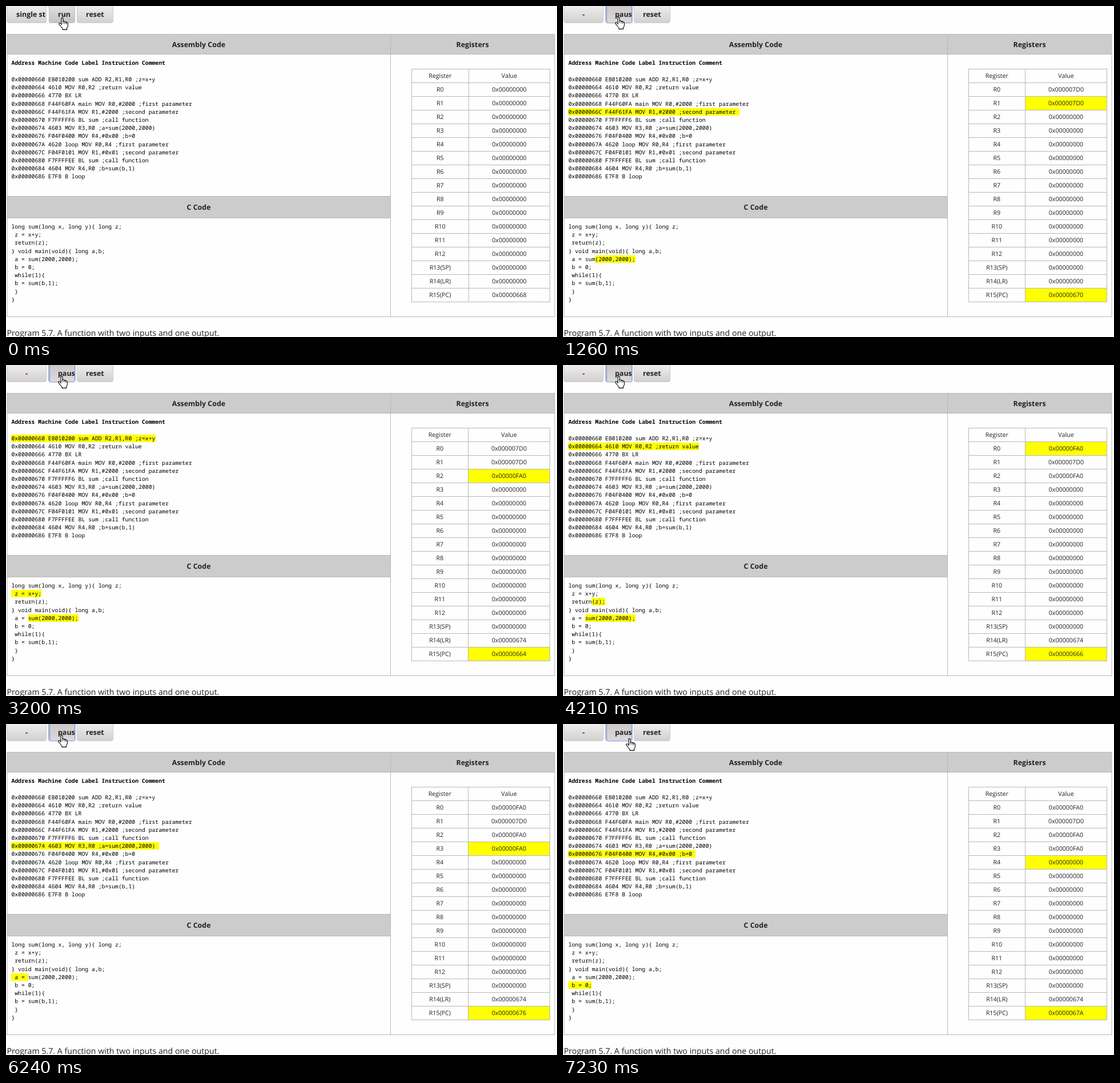
An HTML page that plays this animation: 965 px wide and 580 px high, repeating every 8000 ms.

```html
<!DOCTYPE html>
<html lang="en">
<head>
<meta charset="utf-8">
<title>Assembly simulator</title>
<style>
  html, body { margin: 0; width: 100%; height: 100%; overflow: hidden; background: #fefefe; }
  svg { display: block; width: 965px; height: 580px; }
  text { white-space: pre; text-rendering: geometricPrecision; fill: #222; font-family: "Open Sans", sans-serif; }
  .code { font: 9.778px "Noto Sans Mono", monospace; fill: #000; }
  .bold { font-weight: 700; }
  .title { font-size: 12.44px; font-weight: 700; }
  .cell { font-size: 10.67px; }
  .mid { text-anchor: middle; }
  .note { font-size: 14.22px; }
</style>
</head>
<body>
<svg id="stage" viewBox="0 0 965 580"></svg>
<script>
const LOOP = 8000, CHAR = 5.867, LEFT = 9.4, PITCH = 14.2;
const YELLOW = '#ff0', RED = '#ff4040', LINE = '#b8b8b8';

const asm = [
  '0x00000660 EB010200 sum ADD R2,R1,R0 ;z=x+y',
  '0x00000664 4610 MOV R0,R2 ;return value',
  '0x00000666 4770 BX LR',
  '0x00000668 F44F60FA main MOV R0,#2000 ;first parameter ',
  '0x0000066C F44F61FA MOV R1,#2000 ;second parameter ',
  '0x00000670 F7FFFFF6 BL sum ;call function ',
  '0x00000674 4603 MOV R3,R0 ;a=sum(2000,2000) ',
  '0x00000676 F04F0400 MOV R4,#0x00 ;b=0 ',
  '0x0000067A 4620 loop MOV R0,R4 ;first parameter',
  '0x0000067C F04F0101 MOV R1,#0x01 ;second parameter',
  '0x00000680 F7FFFFEE BL sum ;call function',
  '0x00000684 4604 MOV R4,R0 ;b=sum(b,1)',
  '0x00000686 E7F8 B loop'
];
const csrc = [
  'long sum(long x, long y){ long z;', ' z = x+y;', ' return(z);',
  '} void main(void){ long a,b;', ' a = sum(2000,2000);', ' b = 0;',
  ' while(1){', ' b = sum(b,1);', ' }', '}'
];

// at: time, pc: executed line, c: [line, from, to] marks, set: written registers
const call = [4, 5, 20], args = [4, 8, 20];
const steps = [
  { at: 320, pc: 3, c: [args], set: { 0: 0x7D0, 15: 0x66C } },
  { at: 1260, pc: 4, c: [args], set: { 1: 0x7D0, 15: 0x670 } },
  { at: 2270, pc: 5, c: [call], set: { 14: 0x674, 15: 0x660 }, ret: 6 },
  { at: 3200, pc: 0, c: [[1, 0, 9], call], set: { 2: 0xFA0, 15: 0x664 } },
  { at: 4210, pc: 1, c: [[2, 7, 11], call], set: { 0: 0xFA0, 15: 0x666 } },
  { at: 5220, pc: 2, c: [[3, 0, 1], call], set: { 15: 0x674 } },
  { at: 6240, pc: 6, c: [[4, 0, 5]], set: { 3: 0xFA0, 15: 0x676 } },
  { at: 7230, pc: 7, c: [[5, 0, 7]], set: { 4: 0, 15: 0x67A } }
];

// time, x, y of the hand pointer
const pointer = [
  [0, 92, 20], [80, 91, 19], [6300, 92, 17], [6380, 93, 14], [6450, 92, 12], [6530, 91, 12],
  [6780, 100, 16], [6850, 112, 23], [6930, 123, 27], [7000, 117, 27], [7080, 110, 25]
];

const rect = (x, y, w, h, fill, more = '') =>
  `<rect x="${x}" y="${y}" width="${w}" height="${h}" fill="${fill}" ${more}/>`;
const text = (x, y, str, cls) => `<text x="${x}" y="${y}" class="${cls}">${str}</text>`;
const path = (d, more) => `<path d="${d}" ${more}/>`;
const baseline = (top, i) => top + Math.round(PITCH * i);
const hex = n => '0x' + n.toString(16).toUpperCase().padStart(8, '0');

function mark(top, i, from, to, fill) {
  const x = Math.round(LEFT + from * CHAR);
  return rect(x, baseline(top, i) - 10, Math.round(LEFT + to * CHAR) - x, 13, fill);
}

const listing = (top, lines) =>
  lines.map((s, i) => text(LEFT, baseline(top, i), s, 'code')).join('');

function button(x, w, label, fill, edge, textX) {
  return rect(x + .5, -5.5, w - 1, 35, `url(#${fill})`, `rx="3" stroke="${edge}"`) +
    `<svg x="${x + 1}" width="${w - 2}" height="29">` + (textX
      ? text(textX - x - 1, 19, label, 'title')
      : text(w / 2 - 1, 19, label, 'title mid')) + '</svg>';
}

function toolbar(t) {
  const on = t >= 320, down = t >= 250;
  return button(1, 70, on ? '-' : 'single step', 'up', '#cfcccc', on ? 0 : 18) +
    button(75, 46, on ? 'pause' : 'run', down ? 'down' : 'hover', down ? '#7d9fd6' : '#c4c0c0', 91) +
    (down ? rect(74.5, -6, 47, 36, 'none', 'rx="3" stroke="#a9c0e6"') +
      path('M77 0V28', 'stroke="#b5b0b4" stroke-width="2" opacity=".6"') : '') +
    button(124, 64, 'reset', 'up', '#cfcccc', 140);
}

function registers(t, done) {
  const value = Array(16).fill(0);
  value[15] = 0x668;
  done.forEach(s => Object.assign(value, s.set));
  const last = done.length ? done[done.length - 1].set : {};
  const split = done.length ? 809 : 810, mid1 = (710 + split) / 2 + .3, mid2 = (split + 953) / 2;
  let out = text(mid1, 126, 'Register', 'cell mid') + text(mid2, 126, 'Value', 'cell mid');
  let grid = `M710.5 110V519M${split + .5} 110V519M952.5 110V519M710 110.5H953`;
  const names = { 13: '(SP)', 14: '(LR)', 15: '(PC)' };
  let fills = '';
  value.forEach((v, i) => {
    const y = 134 + 24 * i;
    if (i in last) fills += rect(split, y, 953 - split, 24, i == 14 ? RED : YELLOW);
    out += text(mid1, y + 16, 'R' + i + (names[i] || ''), 'cell mid') +
      text(mid2, y + 16, hex(v), 'cell mid');
    grid += `M710 ${y + .5}H953`;
  });
  return fills + path(grid + 'M710 518.5H953', `stroke="${LINE}" fill="none"`) + out;
}

function hand(t) {
  const [, x, y] = pointer.filter(p => p[0] <= t).pop();
  return `<g transform="translate(${x} ${y})" stroke="#000" stroke-linejoin="round">` +
    path('M5 13V2Q5 .6 6.5 .6T8 2V7.5Q8 6.6 9.4 6.7T11 8.3Q11 7.5 12.3 7.6T13.7 9.2Q14 8.6 15 8.8T16.4 10.5V15Q16 17.5 14.5 19V21.4H7V19.5L3.2 15 1 11.9Q.4 10 2 9.8T5 12.5Z', 'fill="#fff" stroke-width="1.1"') +
    path('M8 7V11M11 8V11.5M13.7 9V12', 'fill="none" stroke-width=".9"') + '</g>';
}

const gradient = (id, a, b) =>
  `<linearGradient id="${id}" x2="0" y2="1"><stop stop-color="${a}"/><stop offset="1" stop-color="${b}"/></linearGradient>`;

const defs = '<defs>' + gradient('up', '#f4f2f2', '#d2cfcf') +
  gradient('hover', '#e6e3e3', '#c6c2c2') + gradient('down', '#c9c5c8', '#dcd9da') + '</defs>';

const frame = rect(2, 49, 959, 36, '#ccc') + rect(2, 333, 672, 39, '#ccc') +
  path('M1.5 49.5H961.5M1.5 84.5H961.5M1.5 333.5H674M1.5 371.5H674M1.5 544.5H961.5M2 49V545M673.5 49V545M961 49V545',
    `stroke="${LINE}" fill="none"`) +
  text(337.5, 72, 'Assembly Code', 'title mid') +
  text(817, 72, 'Registers', 'title mid') +
  text(337.5, 357, 'C Code', 'title mid') +
  text(LEFT, 103, 'Address Machine Code Label Instruction Comment', 'code bold') +
  text(1.5, 578, 'Program 5.7. A function with two inputs and one output.', 'note');

function scene(t) {
  const done = steps.filter(s => s.at <= t), now = done[done.length - 1];
  let marks = '';
  if (now) {
    marks = mark(132, now.pc, 0, asm[now.pc].length, YELLOW) +
      now.c.map(m => mark(390, ...m, YELLOW)).join('');
    if (now.ret) marks += mark(132, now.ret, 0, 10, RED);
  }
  return defs + frame + marks + listing(132, asm) + listing(390, csrc) +
    registers(t, done) + toolbar(t) + hand(t);
}

const stage = document.getElementById('stage'), start = performance.now();
let shown = '';
function draw() {
  const next = scene((performance.now() - start) % LOOP);
  if (next !== shown) stage.innerHTML = shown = next;
  requestAnimationFrame(draw);
}
draw();
</script>
</body>
</html>
```
